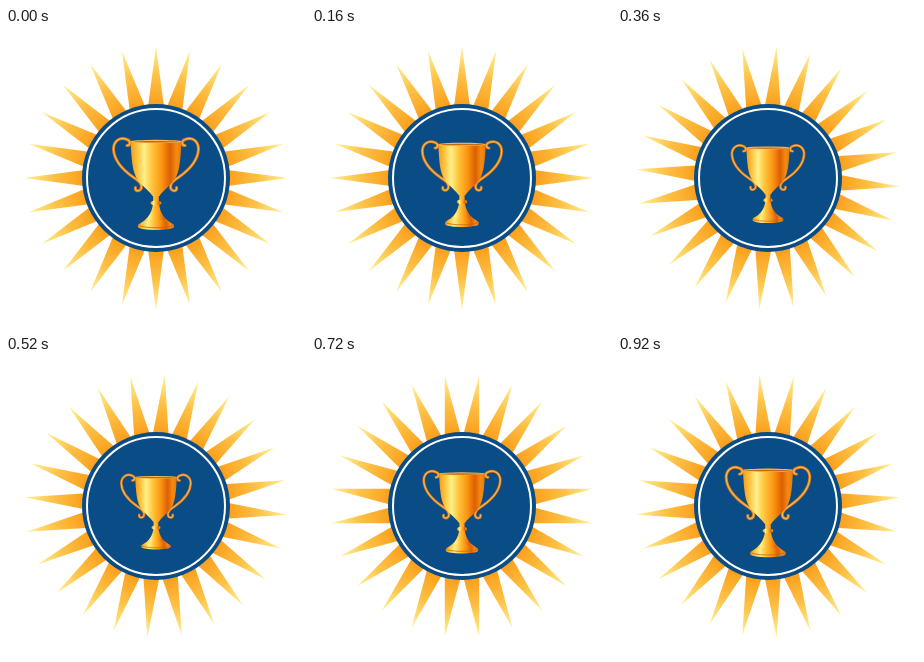
Write an HTML page that moves like this. It is 300 px wide and 300 px high and loops after 0.96 s.

```html
<!DOCTYPE html>
<html lang="en">
<head>
<meta charset="utf-8">
<title>Trophy badge</title>
<style>
html, body { margin: 0; width: 100%; height: 100%; overflow: hidden; background: #fff; }
svg { display: block; width: 100%; height: 100%; }
</style>
</head>
<body>
<svg viewBox="0 0 300 300">
  <defs>
    <radialGradient id="sun" gradientUnits="userSpaceOnUse" cx="0" cy="0" r="132">
      <stop offset=".55" stop-color="#fb9f1c"/>
      <stop offset=".78" stop-color="#fdc247"/>
      <stop offset="1" stop-color="#fff29a"/>
    </radialGradient>
    <linearGradient id="gold">
      <stop offset="0" stop-color="#f59a1a"/>
      <stop offset=".12" stop-color="#ffc03a"/>
      <stop offset=".27" stop-color="#fff08a"/>
      <stop offset=".42" stop-color="#ffc53c"/>
      <stop offset=".62" stop-color="#fb9310"/>
      <stop offset=".78" stop-color="#dc5f04"/>
      <stop offset=".9" stop-color="#f58a12"/>
      <stop offset="1" stop-color="#e67a0c"/>
    </linearGradient>
    <path id="handle" fill="none" stroke-linecap="round" d="M121 117.500C124.500 117.500 125 113 121 111.500C114 108.500 107.500 113 107.500 121C108 132 117 142 127 149C133 153 137 156 135 161C133 164 128.500 163 129.500 159.500"/>
  </defs>

  <path id="rays" fill="url(#sun)"/>
  <circle cx="150" cy="150" r="74" fill="#0a4c86"/>
  <circle cx="150" cy="150" r="69" fill="none" stroke="#fff" stroke-width="2"/>

  <g id="cup">
    <g stroke="#d9781a" stroke-width="3">
      <use href="#handle"/>
      <use href="#handle" transform="matrix(-1 0 0 1 300 0)"/>
    </g>
    <g stroke="#fbb54a" stroke-width="1.300">
      <use href="#handle"/>
      <use href="#handle" transform="matrix(-1 0 0 1 300 0)"/>
    </g>
    <path fill="url(#gold)" d="M147 166H153C152 178 154 188 165 195H135C146 188 148 178 147 166Z"/>
    <path fill="url(#gold)" d="M124.500 113.500H175.500C174.500 130 174 141 170 149C166 157 157 162 153.500 168H146.500C143 162 134 157 130 149C126 141 125.500 130 124.500 113.500Z"/>
    <ellipse cx="150" cy="113.500" rx="25.500" ry="1.700" fill="#fcbf4a"/>
    <ellipse cx="150" cy="113.800" rx="23.500" ry=".8" fill="#c56a10"/>
    <ellipse cx="150" cy="175" rx="5.500" ry="2.500" fill="url(#gold)"/>
    <path fill="url(#gold)" d="M132 197C136 193 143 192 150 192S164 193 168 197V199C167 203 133 203 132 199Z"/>
    <path fill="none" stroke="#c96508" stroke-width=".8" d="M132.500 197.500C140 200.500 160 200.500 167.500 197.500"/>
  </g>
</svg>
<script>
const LOOP = 960, STEP = 40, RAYS = 24;
const rays = document.getElementById('rays');
const cup = document.getElementById('cup');

let outline = '';
for (let i = 0; i < RAYS * 2; i++) {
  const angle = i * Math.PI / RAYS;
  const radius = i % 2 ? 66.5 : 132;
  outline += `${i ? 'L' : 'M'}${radius * Math.sin(angle)} ${-radius * Math.cos(angle)}`;
}
rays.setAttribute('d', outline + 'Z');

function draw() {
  const time = Math.floor(performance.now() % LOOP / STEP) * STEP;
  const phase = time / LOOP;
  const scale = 0.8 + 0.2 * Math.abs(1 - 2 * phase);
  rays.setAttribute('transform', `translate(150 150) rotate(${phase * 90})`);
  cup.setAttribute('transform', `translate(150 156) scale(${scale}) translate(-150 -156)`);
  requestAnimationFrame(draw);
}
draw();
</script>
</body>
</html>
```
